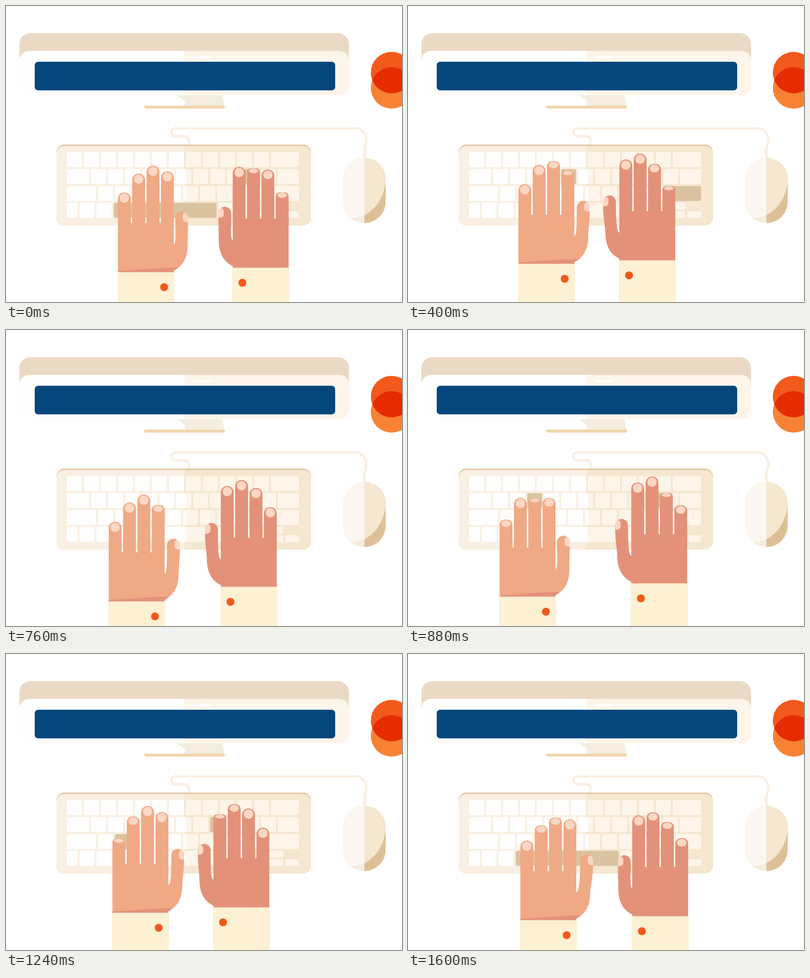
These frames come from a looping animation (800 px wide and 600 px high, 1.64 s). An HTML page with a canvas:

```html
<!DOCTYPE html>
<html lang="en">
<head>
<meta charset="utf-8">
<title>Typing hands</title>
<style>
html, body { margin: 0; width: 100%; height: 100%; overflow: hidden; background: #fff; }
canvas { display: block; width: 800px; height: 600px; }
</style>
</head>
<body>
<canvas id="stage" width="800" height="600"></canvas>
<script>
const ctx = document.getElementById('stage').getContext('2d');
const LOOP = 1640, STEP = 40;
const NAIL = '#fcd7c4', CREAM = '#f9efe2', SAND = '#f5e7d0', TAN = '#dfc199', PRESSED = '#dac3a0';
const PINKY = 0, RING = 1, MIDDLE = 2, INDEX = 3;
const TIPS = [-161, -200, -216, -204];
const DEPTHS = [11, 17, 17, 16];

const poseTimes = [0, 160, 400, 640, 880, 1240, 1600];
// A press is [time, finger, row, column]; row and column name the key that lights up.
const left = {
  skin: '#f0a985',
  x: [226, 189, 223, 230, 185, 215, 227],
  y: [539, 522, 522, 556, 540, 524, 539],
  thumb: [0, 0, 0.4, 0.7, 0, 0.6, 1],
  presses: [
    [160, PINKY, 2, 1], [230, MIDDLE], [400, INDEX, 1, 5], [455, MIDDLE],
    [640, RING, 2, 3], [810, INDEX], [880, MIDDLE, 1, 3], [935, PINKY],
    [1060, INDEX, 1, 4], [1240, PINKY, 2, 2], [1308, RING],
    [1420, INDEX, 1, 5], [1545, MIDDLE], [1545, RING]
  ]
};
const right = {
  skin: '#e39279', mirrored: true,
  x: [458, 434, 427, 417, 451, 419, 453],
  y: [530, 535, 515, 527, 513, 513, 531],
  thumb: [0, 0.4, 0.8, 0.5, 0.7, 0.5, 0],
  presses: [
    [1665, MIDDLE, 1, 10], [1670, PINKY], [160, INDEX, 1, 9], [215, MIDDLE],
    [330, RING], [400, PINKY, 2, 11], [595, RING, 0, 10], [640, MIDDLE],
    [880, RING, 1, 10], [950, PINKY], [1060, MIDDLE, 0, 10],
    [1240, INDEX, 1, 8], [1300, MIDDLE], [1420, RING, 1, 10], [1550, RING]
  ]
};
const SPACE_PRESS = [1600, null, 3, 3];

// Periodic cubic through the poses that never overshoots them.
function track(values, time) {
  const n = values.length;
  const at = i => poseTimes[(i + n) % n] + Math.floor(i / n) * LOOP;
  const val = i => values[(i + n) % n];
  const slope = i => (val(i + 1) - val(i)) / (at(i + 1) - at(i));
  const tangent = i => {
    const a = slope(i - 1), b = slope(i);
    return a * b <= 0 ? 0 : 2 * a * b / (a + b);
  };
  let i = n - 1;
  while (poseTimes[i] > time) i--;
  const span = at(i + 1) - at(i), u = (time - at(i)) / span, v = 1 - u;
  return val(i) * (1 + 2 * u) * v * v + val(i + 1) * (3 - 2 * u) * u * u
    + span * u * v * (tangent(i) * v - tangent(i + 1) * u);
}

function distance(a, b) {
  const d = Math.abs(a - b) % LOOP;
  return Math.min(d, LOOP - d);
}

function pressure(hand, finger, time) {
  return Math.max(0, ...hand.presses.filter(p => p[1] === finger).map(p => {
    const d = distance(p[0], time);
    return d < 110 ? Math.cos(d / 110 * Math.PI / 2) ** 2 : 0;
  }));
}

function rect(x, y, w, h, color) {
  ctx.fillStyle = color;
  ctx.fillRect(x, y, w, h);
}

function round(x, y, w, h, r, color) {
  ctx.fillStyle = color;
  ctx.beginPath();
  ctx.roundRect(x, y, w, h, r);
  ctx.fill();
}

function disc(x, y, r, color) {
  ctx.fillStyle = color;
  ctx.beginPath();
  ctx.arc(x, y, r, 0, 7);
  ctx.fill();
}

function shape(path, color) {
  ctx.fillStyle = color;
  ctx.fill(new Path2D(path));
}

function clipped(addPath, draw) {
  ctx.save();
  ctx.beginPath();
  addPath();
  ctx.clip();
  draw();
  ctx.restore();
}

const PITCH = 34.33, KEY = 30.5;
const run = (x, y, count) =>
  Array.from({ length: count }, (_, i) => [x + i * PITCH, y, KEY, KEY]);
const keys = [
  [...run(123, 296, 12), [535, 296, 57, KEY]],
  [[123, 330.5, 45, KEY], ...run(172, 330.5, 11), [549, 330.5, 43, KEY]],
  [[123, 365, 59, KEY], ...run(186, 365, 10), [529, 365, 63, KEY]],
  [[123, 399, 22, KEY], ...run(148.5, 399, 2), [217.5, 399, 208, KEY], ...run(429, 399, 2),
    [497, 416, 30, 14], [531, 399, 29, 14], [531, 416, 29, 14], [564.5, 416, 27.5, 14]]
];

function drawMonitor() {
  round(27, 55, 666, 80, 22, '#eadac5');
  clipped(() => ctx.roundRect(27, 91, 666, 90, 20), () => {
    rect(27, 91, 334, 90, '#fefefe');
    rect(361, 91, 332, 90, '#fef5ea');
  });
  round(378, 101.5, 36, 4.5, 2, '#fff');
  round(58, 113, 607, 58, 7, '#05477d');
  shape('M345 181H437L441 203H361V192Z', '#f5ede0');
  shape('M279 202H442V205Q442 208 439 208H282Q279 207 279 202Z', '#f1d6ab');
}

function drawCircles() {
  disc(779, 166, 42, '#f78234');
  disc(779, 135, 42, '#f2591b');
  clipped(() => ctx.arc(779, 135, 42, 0, 7), () => disc(779, 166, 42, '#e62b00'));
}

function drawMouse() {
  ctx.strokeStyle = CREAM;
  ctx.lineWidth = 5;
  ctx.stroke(new Path2D('M369 284V274Q369 264 359 264H343C331 264 331 248 343 248'
    + 'H706C719 248 728 260 728 271C728 281 724 282 724 295V310'));
  clipped(() => ctx.roundRect(681, 308, 86, 132, 43), () => {
    rect(681, 308, 43, 132, '#f5ecdf');
    rect(724, 308, 43, 132, '#dec097');
    clipped(() => {
      ctx.moveTo(681, 308);
      ctx.lineTo(767, 308);
      ctx.lineTo(767, 357);
      ctx.bezierCurveTo(762, 395, 738, 428, 698, 431);
      ctx.lineTo(681, 431);
    }, () => {
      rect(681, 308, 43, 132, '#fbf6ef');
      rect(724, 308, 43, 132, SAND);
    });
  });
}

function drawKeyboard(time) {
  round(102, 281, 514, 164, 16, TAN);
  clipped(() => ctx.roundRect(102, 283.5, 514, 161.5, 16), () => {
    rect(102, 283, 258, 162, CREAM);
    rect(360, 283, 256, 162, SAND);
  });
  const addKeys = () => keys.flat().forEach(k => ctx.roundRect(...k, 3));
  clipped(addKeys, () => {
    rect(102, 283, 262, 162, '#fefefe');
    rect(364, 283, 252, 162, '#fef5ea');
  });
  for (const [at, , row, column] of [...left.presses, ...right.presses, SPACE_PRESS]) {
    if (row !== undefined && distance(at, time) < 50) round(...keys[row][column], 3, PRESSED);
  }
}

function drawFinger(x, tip, press, skin) {
  const r = 13 - 6 * press;
  round(x, tip, 26, -95 - tip, [r, r, 0, 0], skin);
  const h = 19 - 11 * press;
  ctx.fillStyle = NAIL;
  ctx.beginPath();
  ctx.ellipse(x + 13, tip + 2 - 1.5 * press + h / 2, 9.5, h / 2, 0, 0, 7);
  ctx.fill();
}

function drawThumb(bend, skin) {
  const x = 116 + 5 * bend, top = -123 - 10 * bend;
  const addThumb = () => {
    ctx.moveTo(100, -2);
    ctx.lineTo(100, -55);
    ctx.lineTo(113, -55);
    ctx.bezierCurveTo(118, -59, x, -75, x, top + 13);
    ctx.arc(x + 13, top + 13, 13, Math.PI, 0);
    ctx.bezierCurveTo(x + 26, -80, 141, -68, 141, -50);
    ctx.bezierCurveTo(140, -27, 130, -11, 113, -3);
  };
  clipped(addThumb, () => {
    rect(90, -150, 70, 150, skin);
    round(x + 15, top + 2, 20, 20, 7, NAIL);
  });
}

function drawHand(hand, time) {
  const x = track(hand.x, time), y = track(hand.y, time);
  ctx.save();
  ctx.translate(hand.mirrored ? x + 113 : x, y);
  if (hand.mirrored) ctx.scale(-1, 1);
  drawThumb(track(hand.thumb, time), hand.skin);
  rect(0, -99, 113, 100, hand.skin);
  TIPS.forEach((tip, finger) => {
    const press = pressure(hand, finger, time);
    drawFinger(finger * 29, tip + DEPTHS[finger] * press, press, hand.skin);
  });
  if (!hand.mirrored) shape('M0 -2L105 -9L122 -9Q117 -4 113 -3V1H0Z', right.skin);
  rect(-1, 0.5, 115, 200, '#fdf0d3');
  disc(93.5, 31, 8, '#f2591b');
  ctx.restore();
}

function draw(time) {
  rect(0, 0, 800, 600, '#fff');
  drawMonitor();
  drawCircles();
  drawMouse();
  drawKeyboard(time);
  drawHand(left, time);
  drawHand(right, time);
}

const start = performance.now();
function tick() {
  const elapsed = (performance.now() - start) % LOOP;
  draw(Math.floor(elapsed / STEP) * STEP);
  requestAnimationFrame(tick);
}
tick();
</script>
</body>
</html>
```
